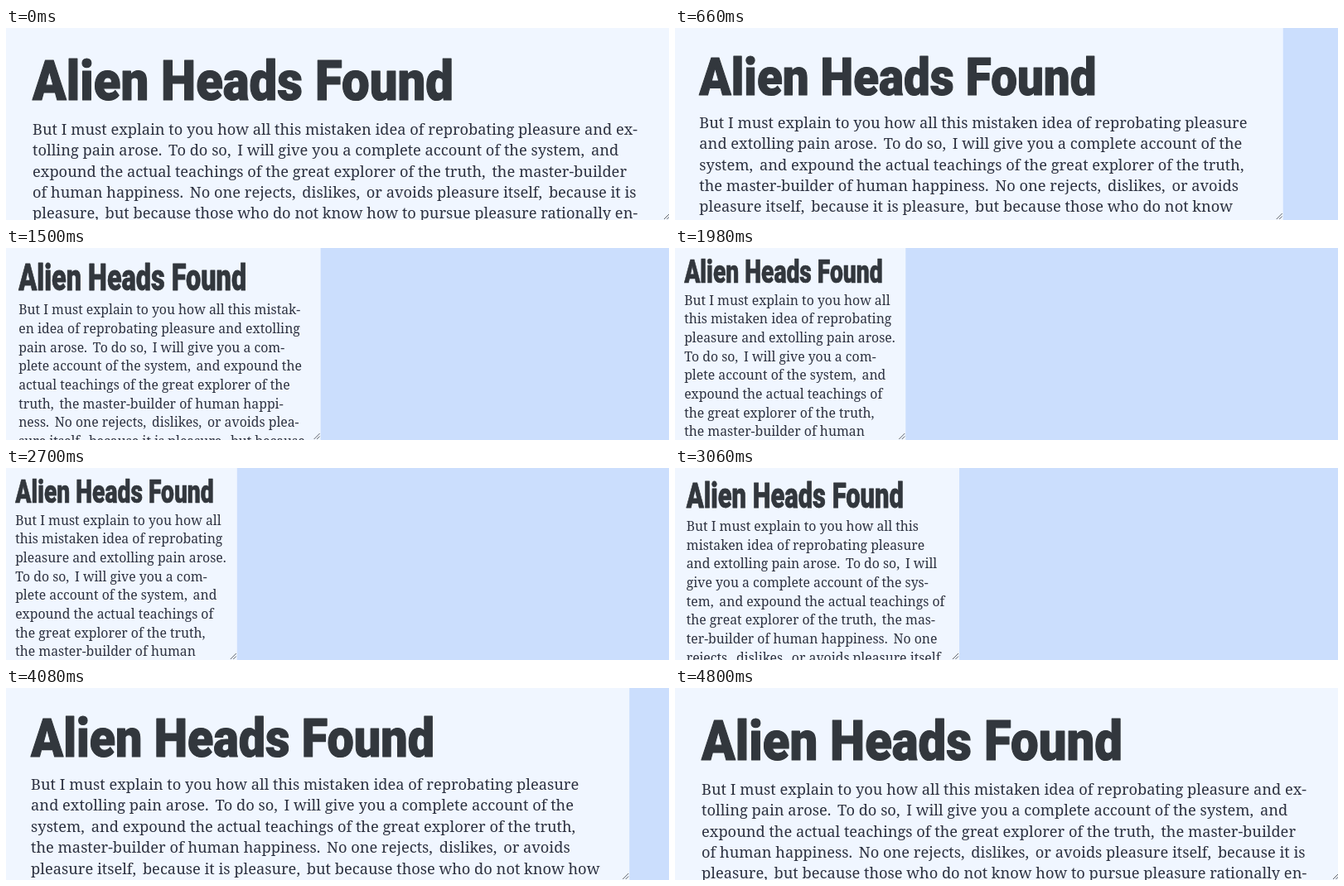
Recreate the animation shown at these times as an HTML page with a canvas. Size 800 by 232 pixels, loop 4.86 s.

```html
<!DOCTYPE html>
<html lang="en">
<head>
<meta charset="utf-8">
<title>Resizing article</title>
<style>
  html, body { margin: 0; height: 100%; overflow: hidden; background: #cbdefd; }
  canvas { display: block; }
</style>
</head>
<body>
<canvas id="stage" width="800" height="232"></canvas>
<script>
const ctx = document.getElementById('stage').getContext('2d');
const LOOP = 4860, STEP = 60, TURN = 2336;
const NARROW = 275, WIDE = 802;
const SERIF = '"Noto Serif", serif', SANS = 'Roboto, sans-serif';

const TITLE = 'Alien Heads Found';
// A bar marks a place where a word may be hyphenated.
const COPY = `But I must ex|plain to you how all this mis|tak|en idea of rep|ro|bat|ing
  plea|sure and ex|tol|ling pain arose. To do so, I will give you a com|plete ac|count of
  the sys|tem, and ex|pound the ac|tu|al teach|ings of the great ex|plor|er of the truth,
  the mas|ter-|builder of hu|man hap|pi|ness. No one re|jects, dis|likes, or avoids
  plea|sure it|self, be|cause it is plea|sure, but be|cause those who do not know how to
  pur|sue plea|sure ra|tio|nal|ly en|counter con|se|quences that are ex|treme|ly
  pain|ful.`.split(/\s+/).map(word => word.split('|'));

const clamp = v => Math.min(1, Math.max(0, v));
const mix = (a, b, k) => a + (b - a) * k;

// cubic-bezier(.42, 0, .58, 1)
function easeInOut(x) {
  let lo = 0, hi = 1;
  for (let i = 0; i < 24; i++) {
    const s = (lo + hi) / 2;
    if (1.26 * s - 0.78 * s * s + 0.52 * s ** 3 < x) lo = s; else hi = s;
  }
  return lo * lo * (3 - 2 * lo);
}

function panelWidth(t) {
  const d = Math.abs(t - TURN);
  const away = Math.min(d, LOOP - d);
  return mix(NARROW, WIDE, easeInOut(clamp((away - 248) / 1905)));
}

// Punctuation is set loose, with a sixth of an em before the word space.
const loosen = s => s.replace(/([.,]) /g, '$1\u2006 ');

// Greedy line breaking; hyphenated fragments need a little spare room.
function wrap(words, width, maxLines) {
  const lines = [];
  const size = s => ctx.measureText(loosen(s)).width;
  let line = '';
  for (const parts of words) {
    let rest = parts;
    while (rest.length) {
      const lead = line ? line + ' ' : '';
      if (size(lead + rest.join('')) <= width + 0.5) {
        line = lead + rest.join('');
        break;
      }
      let cut = rest.length - 1, head = '';
      for (; cut > 0; cut--) {
        head = lead + rest.slice(0, cut).join('').replace(/-?$/, '-');
        if (size(head) <= width - 3.5) break;
      }
      if (cut > 0) {
        lines.push(head);
        rest = rest.slice(cut);
      } else {
        lines.push(line);
      }
      line = '';
      if (lines.length >= maxLines) return lines;
    }
  }
  return lines.concat(line);
}

ctx.font = `100px ${SERIF}`;
const sample = 'But I must explain to you how all this';
const meanAdvance = ctx.measureText(sample).width / sample.length / 100;

function drawTitle(x, w, k) {
  const size = 38.3 + 0.056 * (w - 279);
  ctx.save();
  ctx.translate(x, 42 + 0.086 * (w - 279));
  ctx.scale(mix(0.738, 0.886, k), 1);
  ctx.font = `900 ${size}px ${SANS}`;
  ctx.fillStyle = ctx.strokeStyle = '#32373d';
  ctx.lineWidth = size * 0.018;
  ctx.lineJoin = 'round';
  ctx.fillText(TITLE, 0, 0);
  ctx.strokeText(TITLE, 0, 0);
  ctx.restore();
}

function drawCopy(x, w, k) {
  const stretch = mix(0.975, 1, k);
  const size = mix(7.38, 8.535, k) / meanAdvance / stretch;
  const leading = mix(22.7, 25.4, k);
  ctx.save();
  ctx.translate(x, 68.6 + 0.115 * (w - 279));
  ctx.scale(stretch, 1);
  ctx.font = `${size}px ${SERIF}`;
  ctx.fillStyle = '#2d3241';
  wrap(COPY, (w - 2 * x) / stretch, 9)
    .forEach((line, i) => ctx.fillText(loosen(line), 0, i * leading));
  ctx.restore();
}

function drawGrip(w) {
  ctx.strokeStyle = '#5d636e';
  ctx.lineWidth = 1;
  ctx.beginPath();
  for (const reach of [7, 3.5]) {
    ctx.moveTo(w - 1 - reach, 231);
    ctx.lineTo(w - 1, 231 - reach);
  }
  ctx.stroke();
}

function draw(t) {
  const w = panelWidth(t), pad = 0.04 * w;
  const k = clamp((w - 390) / 330);
  ctx.fillStyle = '#cbdefd';
  ctx.fillRect(0, 0, 800, 232);
  ctx.fillStyle = '#f0f6ff';
  ctx.fillRect(0, 0, w, 232);
  ctx.save();
  ctx.beginPath();
  ctx.rect(0, 0, w, 232);
  ctx.clip();
  drawTitle(pad, w, k);
  drawCopy(pad, w, k);
  drawGrip(w);
  ctx.restore();
}

const start = performance.now();
function tick() {
  const t = (performance.now() - start) % LOOP;
  draw(Math.floor(t / STEP) * STEP);
  requestAnimationFrame(tick);
}
tick();
</script>
</body>
</html>
```
